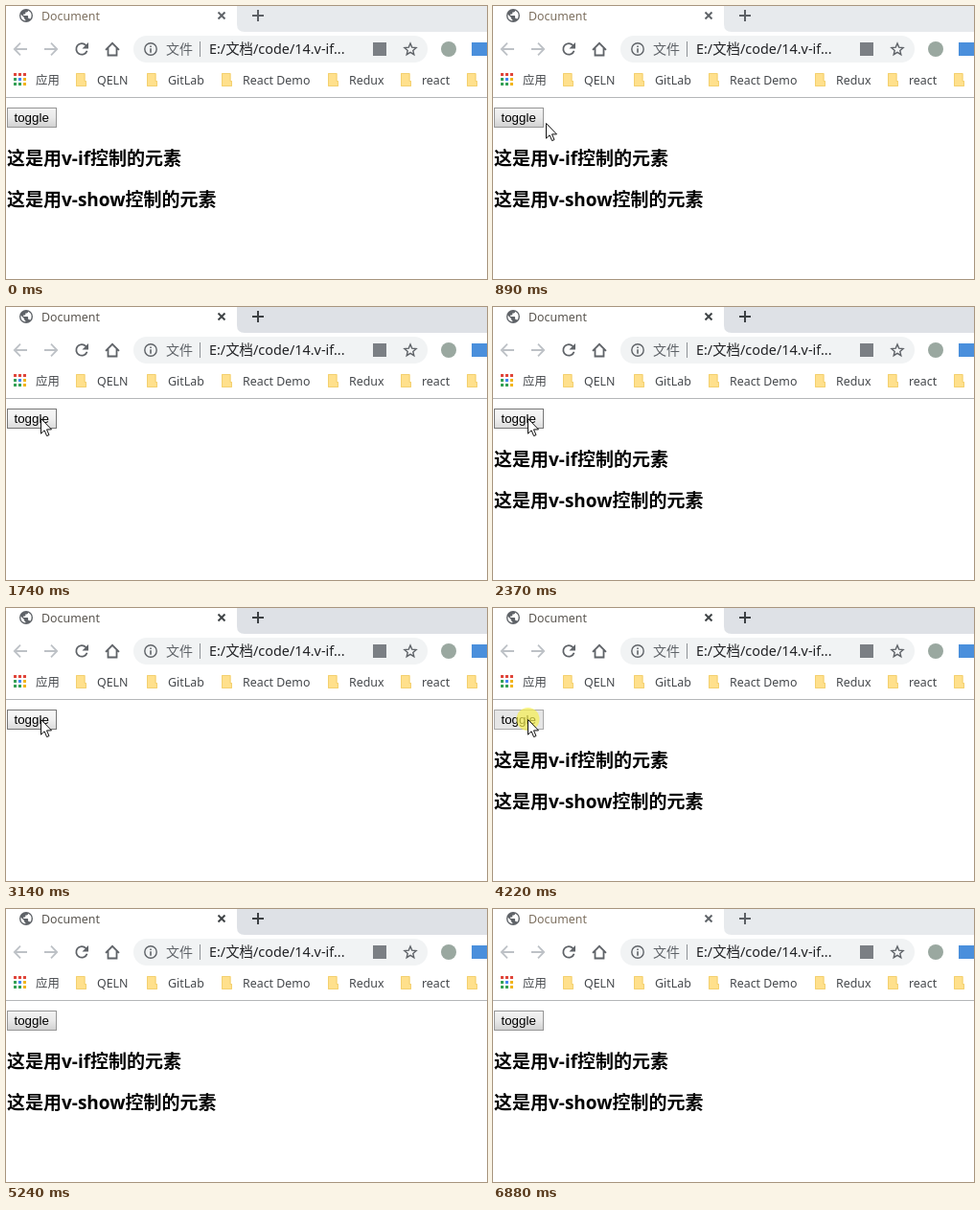
Recreate the animation shown at these times as an HTML page. Size 502x285 px, loop 6950 ms.

```html
<!DOCTYPE html>
<html lang="zh-CN">
<head>
<meta charset="utf-8">
<title>Document</title>
<style>
html, body { margin: 0; width: 100%; height: 100%; overflow: hidden; background: #fff; }
svg { display: block; width: 502px; height: 285px; }
text { font-family: "Noto Sans", "Noto Sans CJK SC", "Noto Sans CJK", sans-serif; white-space: pre; }
.label { font-size: 12.4px; fill: #45484c; }
.url { font-size: 14.4px; fill: #202124; }
.head { font-size: 19px; font-weight: 700; }
.btn { font: 13.33px "Liberation Sans", Arial, sans-serif; }
.line { fill: none; stroke: #5f6368; stroke-width: 1.8; }
.faint { stroke: #bdc1c6; }
.thin { stroke-width: 1.4; }

.strip, .title, .tools, .hover, .press, .heads, .cursor {
  animation: 6950ms step-end infinite;
}
.strip { animation-name: strip; }
.title { animation-name: title; }
.tools { animation-name: tools; }
.hover { animation-name: hover; }
.press { animation-name: press; }
.heads { animation-name: heads; }
.cursor { animation-name: show, move; }

/* window focus */
@keyframes strip {
  0%, 98.992% { fill: #e7eaed; }
  24.028% { fill: #dee1e6; }
}
@keyframes title {
  0%, 98.992% { fill: #7d7060; }
  24.028% { fill: #5a5650; }
}
@keyframes tools {
  0%, 98.992% { stroke: #5c6065; }
  24.028% { stroke: #3c4043; }
}
/* button and headings */
@keyframes hover {
  0%, 74.387%, 100% { opacity: 0; }
  13.81% { opacity: 1; }
}
@keyframes press {
  0%, 25.035%, 34.1%, 45.179%, 52.805%, 63.165%, 71.942%, 100% { opacity: 0; }
  22.877%, 31.798%, 42.877%, 51.942%, 60.719%, 69.928% { opacity: 1; }
}
@keyframes heads {
  0%, 34.1%, 52.805%, 71.942%, 100% { opacity: 1; }
  25.035%, 45.179%, 63.165% { opacity: 0; }
}
/* pointer */
@keyframes show {
  0%, 75.395%, 100% { opacity: 0; }
  2.733% { opacity: 1; }
}
@keyframes move {
  0% { transform: translate(307px, 274px); }
  2.733% { transform: translate(307px, 274px); animation-timing-function: steps(3); }
  6.079% { transform: translate(170px, 186px); animation-timing-function: steps(3); }
  9.424% { transform: translate(84px, 139px); animation-timing-function: steps(2); }
  11.654% { transform: translate(57px, 125px); }
  12.805% { transform: translate(55px, 122px); animation-timing-function: steps(8); }
  21.726% { transform: translate(36px, 116px); }
  74.387%, 100% { transform: translate(135px, 202px); }
}
</style>
</head>
<body>
<svg viewBox="0 0 502 285">
  <defs>
    <linearGradient id="face" x2="0" y2="1">
      <stop stop-color="#f3f3f3"/><stop offset=".5" stop-color="#e9e9e9"/><stop offset="1" stop-color="#d0d0d0"/>
    </linearGradient>
    <linearGradient id="lit" x2="0" y2="1">
      <stop stop-color="#f8f8f8"/><stop offset=".5" stop-color="#f0f0f0"/><stop offset="1" stop-color="#dadada"/>
    </linearGradient>
    <g id="folder">
      <path d="M0 0H9.5V8H11V14H0Z" fill="#ffe08c"/>
      <path d="M.5 .5H9V8.5H10.5V13.5H.5Z" fill="none" stroke="#f3d070"/>
    </g>
    <rect id="dot" width="3" height="3"/>
  </defs>
  <rect width="502" height="285" fill="#fff"/>

  <!-- tab strip -->
  <path class="strip" d="M241 0H502V27H249Q241 27 241 19Z"/>
  <circle cx="21" cy="10" r="7" fill="#5f6368"/>
  <path d="M20.3 15.5Q15.4 14.6 15.4 10L15.6 8.7L18.9 12.1Q18.8 14.2 20.3 14.2ZM25.1 13.8Q24.8 12.8 23.1 12.8V10.7Q23.1 10 22.4 10H18.2V8.6H19.6Q20.3 8.6 20.3 7.9V6.5H21.7Q23.1 6.4 23.1 4.8Q26.6 6.3 26.6 10Q26.6 12.2 25.1 13.8Z" fill="#fff"/>
  <text class="label title" x="37" y="15">Document</text>
  <g class="line tools">
    <path d="M221.5 6.5L228.5 13.5M228.5 6.5L221.5 13.5"/>
    <path d="M257 10H269M263 4V16" stroke-width="2"/>
  </g>

  <!-- toolbar -->
  <path class="line faint" d="M22 45H9M15 38.7L8.8 45L15 51.3M40 45H53M47 38.7L53.2 45L47 51.3"/>
  <path class="line" d="M83.4 41A5.8 5.8 0 1 0 84.6 46.7" stroke-width="2"/>
  <path d="M86 38V44.5H79.5Z" fill="#5f6368"/>
  <path class="line" d="M104 45.8L111 38.8L118 45.8M106.5 44V51.5H115.5V44"/>
  <rect x="133" y="31" width="307" height="28" rx="14" fill="#f1f3f4"/>
  <circle class="line thin" cx="151" cy="45" r="6.2"/>
  <path d="M150.2 41.5h1.6v1.6h-1.6zM150.2 44.3h1.6v4.4h-1.6z" fill="#5f6368"/>
  <text class="url" x="167" y="50" style="font-size:14px;fill:#5f6368">文件</text>
  <path d="M202.5 37V53" stroke="#8f9296"/>
  <text class="url" x="212" y="50">E:/文档/code/14.v-if...</text>
  <rect x="383" y="38" width="14" height="14" fill="#7b7f84"/>
  <path class="line thin" d="M422 39L423.7 43.1L428.1 43.5L424.8 46.4L425.8 50.7L422 48.4L418.2 50.7L419.2 46.4L415.9 43.5L420.3 43.1Z"/>
  <circle cx="462" cy="45" r="8" fill="#9aa8a0"/>
  <rect x="486" y="38" width="16" height="14" fill="#4a8fdc"/>

  <!-- bookmarks -->
  <g fill="#e0453a">
    <use href="#dot" x="8" y="70"/><use href="#dot" x="13" y="70"/><use href="#dot" x="18" y="70"/>
  </g>
  <g fill="#34a055">
    <use href="#dot" x="8" y="75"/><use href="#dot" x="8" y="80"/><use href="#dot" x="13" y="80"/>
  </g>
  <use href="#dot" x="13" y="75" fill="#4285f4"/>
  <g fill="#f2b51d"><use href="#dot" x="18" y="75"/><use href="#dot" x="18" y="80"/></g>
  <use href="#folder" x="73" y="70"/>
  <use href="#folder" x="147" y="70"/>
  <use href="#folder" x="225" y="70"/>
  <use href="#folder" x="336" y="70"/>
  <use href="#folder" x="412" y="70"/>
  <use href="#folder" x="481" y="70"/>
  <g class="label">
    <text x="31" y="82">应用</text>
    <text x="95" y="82">QELN</text>
    <text x="169" y="82">GitLab</text>
    <text x="247" y="82">React Demo</text>
    <text x="358" y="82">Redux</text>
    <text x="434" y="82">react</text>
  </g>
  <rect y="95" width="502" height="1" fill="#b4b6b8"/>

  <!-- page -->
  <rect x="1.5" y="106.5" width="51" height="20" fill="url(#face)" stroke="#969696"/>
  <rect class="hover" x="1.5" y="106.5" width="51" height="20" fill="url(#lit)" stroke="#767676"/>
  <rect class="press" x="1.5" y="106.5" width="51" height="20" fill="#e6e6e6" stroke="#a9a9a9"/>
  <text class="btn" x="8.5" y="121">toggle</text>
  <g class="heads">
    <text class="head" x="1" y="166">这是用v-if控制的元素</text>
    <text class="head" x="1" y="209">这是用v-show控制的元素</text>
  </g>
  <circle class="press" cx="36.5" cy="116" r="12" fill="#f5ee50" fill-opacity=".7"/>
  <g class="cursor">
    <path d="M.5 .5V16.2L4.1 12.8L6.6 18.6L9 17.6L6.5 11.9H11.5Z" fill="#fff" stroke="#111"/>
  </g>
</svg>
</body>
</html>
```
